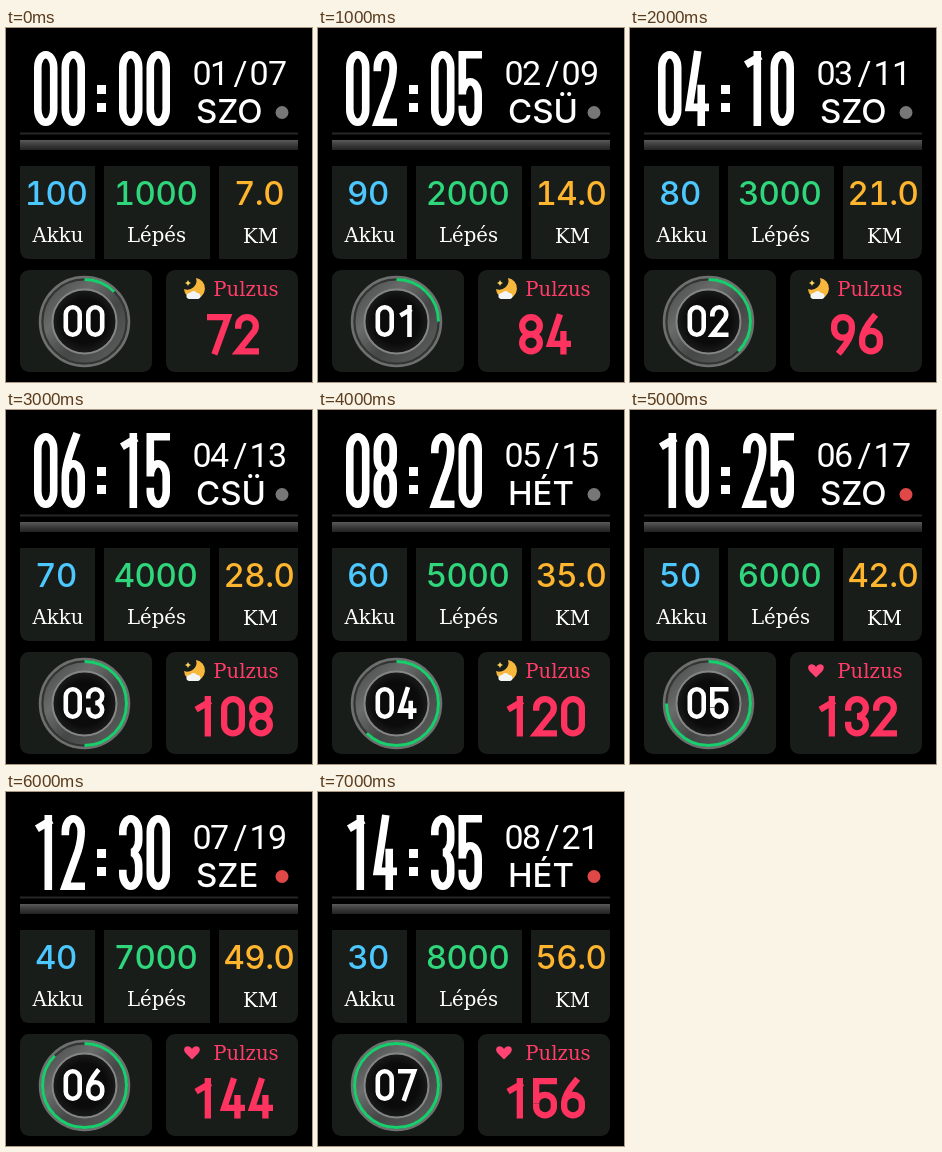
Write an HTML page that moves like this. It is 306x354 px and loops after 8 s.

```html
<!DOCTYPE html>
<html lang="hu">
<head>
<meta charset="utf-8">
<style>
  html, body { margin: 0; width: 100%; height: 100%; overflow: hidden; background: #000; }
  svg { display: block; width: 306px; height: 354px; }
  text { text-anchor: middle; }
  .date { font: 400 34px Roboto, sans-serif; }
  .day { font: 500 33px Inter, sans-serif; text-anchor: start; }
  .value { font: 500 33px Inter, sans-serif; font-variant-numeric: tabular-nums; letter-spacing: -.5px; }
  .label { font: 19.7px "DejaVu Serif", serif; fill: #fff; }
  .digits { fill: none; stroke-linecap: square; stroke-miterlimit: 3; }
</style>
</head>
<body>
<svg viewBox="0 0 306 354">
  <defs>
    <linearGradient id="bar" x2="0" y2="1">
      <stop stop-color="#5a5a5a"/><stop offset=".5" stop-color="#3a3a3a"/><stop offset="1" stop-color="#222"/>
    </linearGradient>
    <linearGradient id="metal" x2="1" y2="1">
      <stop stop-color="#4c4e4d"/><stop offset=".3" stop-color="#6a6c6b"/>
      <stop offset=".6" stop-color="#454746"/><stop offset="1" stop-color="#5c5e5d"/>
    </linearGradient>
    <radialGradient id="hub">
      <stop offset=".6" stop-color="#0b0b0b"/><stop offset="1" stop-color="#222"/>
    </radialGradient>
  </defs>
  <path d="M14 105.5H292" stroke="#262626" stroke-width="2"/>
  <path d="M14 112H292V122H14Z" fill="url(#bar)"/>
  <g fill="#191d1a">
    <path d="M14 138H89V231H24Q14 231 14 221Z"/>
    <path d="M98 138H204V231H98Z"/>
    <path d="M213 138H292V221Q292 231 282 231H213Z"/>
    <rect x="14" y="242" width="132" height="102" rx="9"/>
    <rect x="160" y="242" width="132" height="102" rx="9"/>
  </g>
  <g class="label">
    <text x="52" y="214">Akku</text>
    <text x="150.5" y="214">Lépés</text>
    <text x="254.5" y="214.5">KM</text>
    <text x="240" y="268" style="fill:#ff3d68">Pulzus</text>
  </g>
  <g fill="none">
    <circle cx="78.5" cy="293.5" r="44.5" fill="#333534" stroke="#6e706f" stroke-width="2.5"/>
    <circle cx="78.5" cy="293.5" r="36.5" fill="url(#hub)" stroke="url(#metal)" stroke-width="9"/>
    <circle cx="78.5" cy="293.5" r="32" stroke="#858786" stroke-width="2"/>
  </g>
  <path d="M91 57h9v9h-9zM91 75h9v9h-9z" fill="#fff"/>
  <g id="live"></g>
</svg>
<script>
const live = document.getElementById('live');
const DAYS = ['VAS', 'HÉT', 'KED', 'SZE', 'CSÜ', 'PÉN', 'SZO'];
const pad = n => String(n).padStart(2, '0');

// Centre line of a condensed numeral in a w by h box
function numeral(n, w, h) {
  const r = w / 2, q = Math.min(r * 1.6, h / 4), m = h / 2;
  const arc = (x, y) => `A${r} ${q} 0 0 1 ${x} ${y}`;
  const loop = (a, b) => `M0 ${a + q}${arc(w, a + q)}V${b - q}${arc(0, b - q)}Z`;
  const cap = `M0 ${q}${arc(w, q)}`;
  const bowl = h * .4 + q;
  return [
    loop(0, h),
    `M${w * .66} 0V${h}M${w * .15} ${w * .5}L${w * .66} ${w * .2}`,
    `${cap}Q${w} ${q + h * .13} ${w * .8} ${h * .48}L0 ${h}H${w}`,
    `${cap}V${m - q}${arc(r, m)}${arc(w, m + q)}V${h - q}${arc(0, h - q)}`,
    `M${w * .5} 0L0 ${h * .78}H${w}M${w * .75} ${h * .5}V${h}`,
    `M${w} 0H0V${bowl}${arc(w, bowl)}V${h - q}${arc(0, h - q)}`,
    loop(h * .4, h) + `M${w * .65} 0Q0 ${h * .4} 0 ${bowl}`,
    `M0 0H${w}L${w * .3} ${h}`,
    loop(0, m) + loop(m, h),
    loop(0, h * .6) + `M${w * .35} ${h}Q${w} ${h * .6} ${w} ${h * .6 - q}`
  ][n];
}

// Numerals with outer size w by h, starting at x, y
function digits(value, x, y, w, h, pitch, line, color = '#fff') {
  return `<g class="digits" stroke="${color}" stroke-width="${line}">` + [...String(value)].map((n, i) =>
    `<path transform="translate(${x + i * pitch + line / 2} ${y + line / 2})" d="${numeral(n, w - line, h - line)}"/>`
  ).join('') + '</g>';
}

const text = (cls, x, y, value, fill = '#fff') =>
  `<text class="${cls}" x="${x}" y="${y}" fill="${fill}">${value}</text>`;

const moon = `
  <path d="M190 250A10.5 10.5 0 1 1 178 261A9 9 0 0 0 190 250Z" fill="#f7b63c"/>
  <path d="M183 271a3 3 0 0 1 1-6a4 4 0 0 1 7 0a3 3 0 0 1 1 6z" fill="#f2f4f6"/>
  <path d="M182 252l1 2 2 1-2 1-1 2-1-2-2-1 2-1z" fill="#ffd75c"/>`;
const heart = '<path d="M186 267.5L179.5 261C175 255 183 251.5 186 257C189 251.5 197 255 192.5 261Z" fill="#ff4474"/>';

function scene(k) {
  const month = k + 1, day = 7 + 2 * k, pulse = 72 + 12 * k, late = k > 4;
  const weekday = DAYS[new Date(2023, k, day).getDay()];
  const pulseWidth = (String(pulse).length - 1) * 28 + 24;
  return digits(pad(2 * k), 28, 23, 23.5, 75, 27.5, 7.6) +
    digits(pad(5 * k), 113, 23, 23.5, 75, 27.5, 7.6) +
    text('date', '196 213.5 234.5 253 271.5', 57, `${pad(month)}/${pad(day)}`) +
    text('day', 190, 95, weekday) +
    `<circle cx="276" cy="84.5" r="6.5" fill="${late ? '#e04848' : '#777'}"/>` +
    text('value', 50, 176.5, 100 - 10 * k, '#4cc8ff') +
    text('value', 149.5, 176.5, 1000 * month, '#2fd67b') +
    text('value', 253, 176.5, (7 * month).toFixed(1), '#ffb52e') +
    `<circle cx="78.5" cy="293.5" r="42" fill="none" stroke="#16d06c" stroke-width="3" pathLength="8"
      stroke-dasharray="${month} 8" transform="rotate(-90 78.5 293.5)"/>` +
    digits(pad(k), 57.5, 277, 18.5, 32, 22.5, 4.6) +
    (late ? heart : moon) +
    digits(pulse, 227 - pulseWidth / 2, 286, 24, 40.5, 28, 6.3, '#ff335f');
}

let shown = -1;
function tick() {
  const k = Math.floor(performance.now() / 1000) % 8;
  if (k !== shown) live.innerHTML = scene(shown = k);
  requestAnimationFrame(tick);
}
tick();
</script>
</body>
</html>
```
